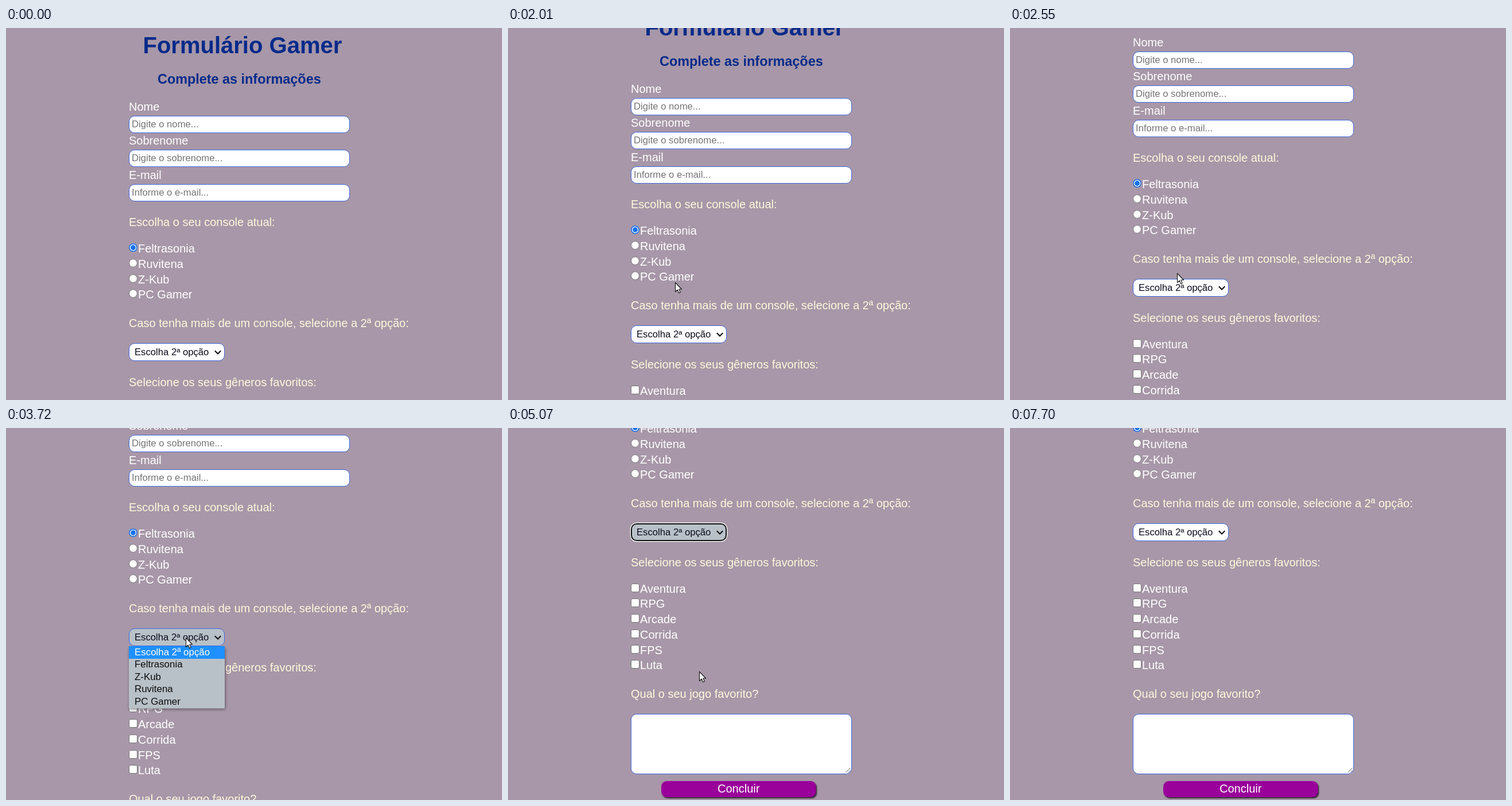
An HTML page that plays this animation: 864x648 px, repeating every 7770 ms.

```html
<!DOCTYPE html>
<html lang="pt">
<head>
<meta charset="utf-8">
<title>Formulário Gamer</title>
<style>
  html, body { margin: 0; width: 100%; height: 100%; overflow: hidden; background: #a797a8; }
  svg { display: block; width: 864px; height: 648px; font-family: "Liberation Sans", Arial, sans-serif; }
  text { white-space: pre; }
</style>
</head>
<body>
<svg id="stage" viewBox="0 0 864 648"></svg>
<script>
const LOOP = 7770, STEP = 72.6;
const LEFT = 214, ROW = 26.7, SMALL = 16.67;
const BORDER = '#4169e1', CREAM = '#fff8dc', NAVY = '#062a8a', GREY = '#b8c1c8', EDGE = '#767676', DARK = '#3c3c3c';
const stage = document.getElementById('stage');

function set(node, attrs) {
  for (const key in attrs) node.setAttribute(key, attrs[key]);
  return node;
}
function el(tag, attrs, parent, content = '') {
  const node = document.createElementNS('http://www.w3.org/2000/svg', tag);
  node.textContent = content;
  return parent.appendChild(set(node, attrs));
}
function text(parent, x, y, content, size = 20, fill = '#fff', weight = 400) {
  return el('text', { x, y, fill, 'font-size': size, 'font-weight': weight }, parent, content);
}
function box(parent, x, y, width, height, rx, fill, stroke = 'none', line = 1) {
  return el('rect', { x, y, width, height, rx, fill, stroke, 'stroke-width': line }, parent);
}
function shadow(parent, x, y, width, height, rx, spread) {
  const node = box(parent, x, y, width, height, rx, '#2a232e');
  node.style.filter = `blur(${spread}px)`;
  return node;
}
const show = (node, on) => set(node, { visibility: on ? 'visible' : 'hidden' });
const within = (t, a, b) => t >= a && t < b;
const ramp = (t, start, length) => Math.max(0, Math.min(1, (t - start) / length));
const smooth = v => v * v * (3 - 2 * v);

// The form, laid out from top to bottom
const page = el('g', {}, stage);
const textAreas = [];

function field(y, width, height) {
  const node = box(page, LEFT + .5, y + .5, width - 1, height - 1, 9.5, '#fff', BORDER);
  textAreas.push(node);
  return node;
}
function question(y, content) {
  textAreas.push(text(page, LEFT, y, content, 20, CREAM));
}
function options(y, names, mark) {
  return names.map((name, i) => {
    const base = Math.round(y + i * ROW);
    text(page, LEFT + 16, base, name);
    return mark(LEFT + 7.5, base - 8.5);
  });
}
const radio = (cx, cy) => el('circle', { cx, cy, r: 6.9, fill: '#fff', stroke: EDGE }, page);
const check = (cx, cy) => box(page, cx - 7, cy - 7, 14, 14, 2.5, '#fff', EDGE);

text(page, 238.5, 44, 'Formulário Gamer', 40, NAVY, 700);
text(page, 264, 97, 'Complete as informações', 23.4, NAVY, 700);
['Nome:Digite o nome...', 'Sobrenome:Digite o sobrenome...', 'E-mail:Informe o e-mail...'].forEach((entry, i) => {
  const [label, hint] = entry.split(':');
  const y = Math.floor(153 + i * 59.5);
  text(page, LEFT, y - 9, label);
  field(y, 385, 30);
  text(page, LEFT + 5, y + 20, hint, SMALL, '#757575');
});

question(345, 'Escolha o seu console atual:');
const consoles = ['Feltrasonia', 'Ruvitena', 'Z-Kub', 'PC Gamer'];
const [chosen] = options(391.2, consoles, radio);
set(chosen, { r: 6.5, 'stroke-width': 1.6 });
const dot = el('circle', { cx: 221.5, cy: 382.5, r: 4.4 }, page);

question(521, 'Caso tenha mais de um console, selecione a 2ª opção:');
const select = box(page, 214.5, 549.5, 166, 30, 9.5, '#fff', BORDER);
const ring = el('g', {}, page);
box(ring, 214, 549, 167, 31, 10, 'none', '#fff', 2.4);
box(ring, 215, 550, 165, 29, 9, 'none', '#101010', 2);
text(page, 224, 570, 'Escolha 2ª opção', SMALL, '#0c0c1c');
el('path', { d: 'M363.8 562.3l5.2 5.2 5.2-5.2', fill: 'none', stroke: '#111', 'stroke-width': 2.1 }, page);

question(624, 'Selecione os seus gêneros favoritos:');
const checks = options(669.75, ['Aventura', 'RPG', 'Arcade', 'Corrida', 'FPS', 'Luta'], check);

question(853, 'Qual o seu jogo favorito?');
field(881, 385, 105);
el('path', { d: 'M588.5 983l8-8M593 983l3.5-3.5', stroke: '#555' }, page);
const shade = shadow(page, 269, 1000, 269, 28, 9, 1.3);
const button = box(page, 267, 998, 269.5, 28, 9.5, '');
text(page, 365, 1018, 'Concluir');

const list = el('g', {}, page);
set(shadow(list, 215, 584, 167, 106, 0, 2.5), { opacity: .6 });
box(list, 214, 580, 167, 108.5, 0, GREY);
box(list, 214, 580, 167, 22, 0, '#1e90ff');
const [first, second, third, last] = consoles;
['Escolha 2ª opção', first, third, second, last].forEach((name, i) =>
  text(list, 224, Math.floor(596 + i * 21.5), name, 16.9, i ? '#0c0c0c' : '#fff'));

// Pointers
const pointer = el('g', {}, stage);
const skin = { fill: '#fff', stroke: '#111', 'stroke-width': 1.1, 'stroke-linejoin': 'round' };
const arrow = el('path', { d: 'M.5 .5V16.5L4.2 13 6.6 18.6 9.2 17.4 6.8 12H11.5Z', ...skin }, pointer);
const beam = el('path', { d: 'M-3-8.5H3M0-8V8M-3 8.5H3', stroke: '#222' }, pointer);
const hand = el('g', {}, pointer);
el('path', { d: 'M-1.7 11V1Q-1.7-.8 0-.8T1.7 1V6.2Q3 5 4.6 6.8 6 5.8 7 7.5 9 7 9 9.4V14Q9 17 7 19V22H-2.5V19.5L-6.2 13.5Q-7 11.5-5.4 11T-1.7 13Z', ...skin }, hand);
el('path', { d: 'M1.7 6V10.5M4.6 7V10.5M7 8V11', stroke: '#111' }, hand);

// Each gesture eases towards a point (x, y) or turns the wheel
const gestures = [
  { at: 70, ms: 410, x: 545, y: 264 },
  { at: 480, ms: 300, x: 378, y: 143 },
  { at: 780, ms: 810, x: 288, y: 395 },
  { at: 1690, ms: 310, x: 291, y: 445 },
  { at: 1800, ms: 430, wheel: 100 },
  { at: 2410, ms: 420, y: 365 },
  { at: 2450, ms: 420, wheel: 100 },
  { at: 3650, ms: 50, x: 313 },
  { at: 4190, ms: 210, x: 323, y: 395 },
  { at: 4500, ms: 425, wheel: 183 },
  { at: 4790, ms: 970, x: 400, y: 618 },
  { at: 5800, ms: 150, x: 406, y: 628 },
  { at: 6710, ms: 130, y: 652 }
];

function pose(t) {
  const p = { x: 799, y: 557, scroll: 0 };
  for (const { at, ms, x = p.x, y = p.y, wheel = 0 } of gestures) {
    const k = smooth(ramp(t, at, ms));
    p.x += (x - p.x) * k;
    p.y += (y - p.y) * k;
    p.scroll += wheel * k;
    if (t < at) break;
  }
  for (const key in p) p[key] = Math.round(p[key]);
  return p;
}
function contains(node, x, y) {
  const b = node.getBBox();
  return within(x, b.x, b.x + b.width) && within(y, b.y, b.y + b.height);
}

function draw(t) {
  // The picture advances in small steps, like a screen capture
  const { x, y, scroll } = pose(Math.floor(t / STEP) * STEP);
  set(page, { transform: `translate(0 ${-scroll})` });

  const accent = within(t, 1450, 1760) ? '#005cc8' : '#1570ee';
  set(chosen, { stroke: accent });
  set(dot, { fill: accent });
  set(checks[0], { stroke: within(t, 4640, 4795) ? DARK : EDGE });
  set(checks[5], { stroke: within(t, 4930, 5070) ? DARK : EDGE });

  set(select, { fill: within(t, 3100, 7700) ? GREY : '#fff' });
  show(ring, within(t, 4190, 7700));
  show(list, within(t, 3100, 4190));
  set(list, { opacity: t < 3190 ? .6 : 1 });

  const hover = ramp(t, 5800, 180) - ramp(t, 6660, 180);
  set(button, { fill: `rgb(${154 * (1 - hover)},0,${154 + 30 * hover})` });
  set(shade, { opacity: 1 - hover });

  const visible = within(t, 70, 6840);
  const overButton = t >= 5850;
  const overText = !overButton && textAreas.some(node => contains(node, x, y + scroll));
  set(pointer, { transform: `translate(${x} ${y})` });
  show(arrow, visible && !overText && !overButton);
  show(beam, visible && overText);
  show(hand, visible && overButton);
}

const start = performance.now();
function tick() {
  draw((performance.now() - start) % LOOP);
  requestAnimationFrame(tick);
}
tick();
</script>
</body>
</html>
```
